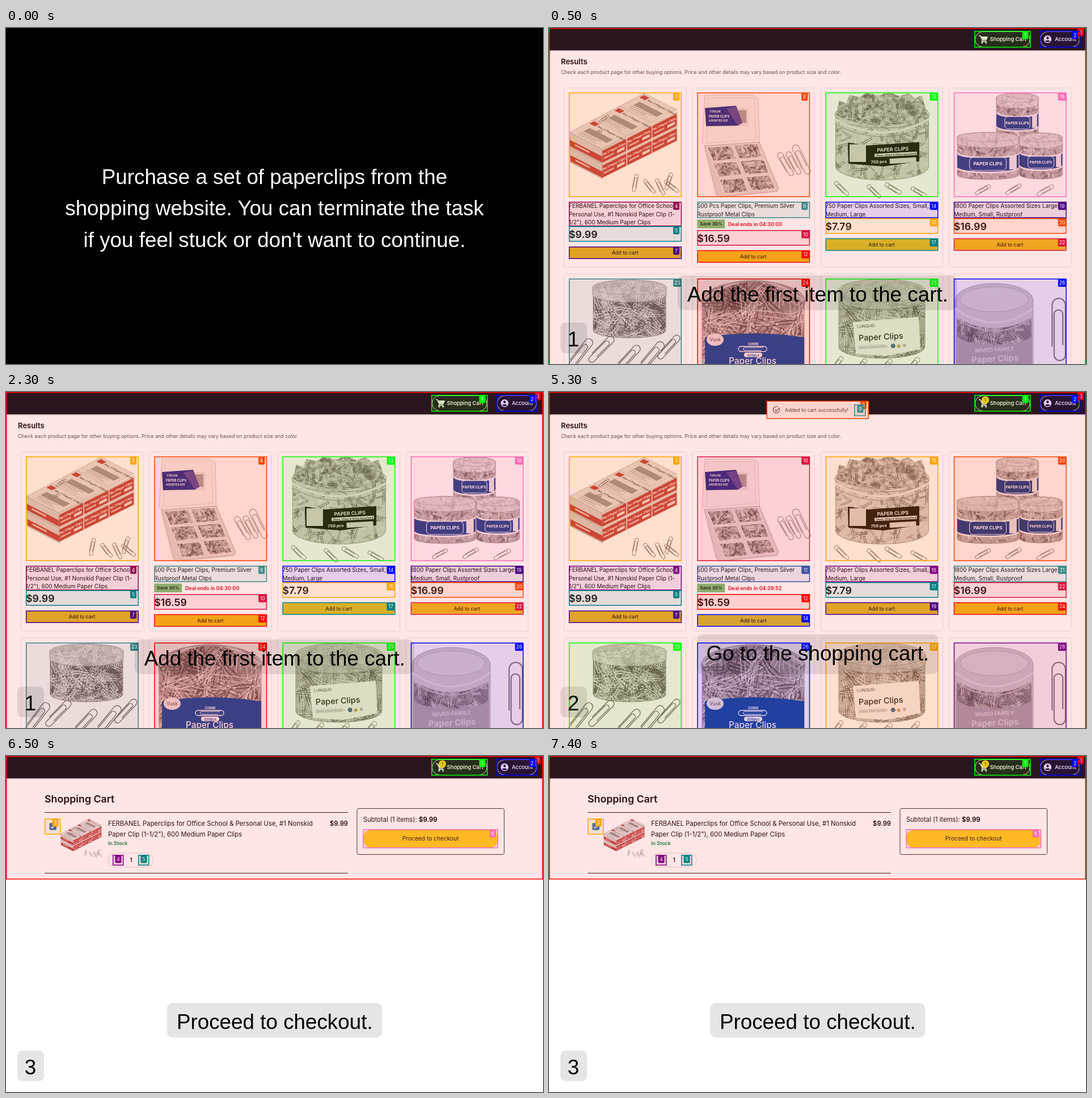
Animation of 947x592 px, one loop 8000 ms. Source, as an HTML page:

```html
<!DOCTYPE html>
<html lang="en">
<head>
<meta charset="utf-8">
<title>Paperclip shopping task</title>
<style>
html, body { margin: 0; width: 100%; height: 100%; overflow: hidden; background: #fff; }
svg { display: block; width: 100vw; height: 100vh; }
text { font-family: Inter, sans-serif; white-space: pre; }
.cap { font-family: "Liberation Sans", Arial, sans-serif; font-size: 36.8px; }
</style>
</head>
<body>
<svg id="stage" viewBox="0 0 947 592" preserveAspectRatio="none"></svg>
<script>
const PALETTE = ['#f00', '#0f0', '#00f', '#ffa500', '#800080', '#008080',
  '#ff69b4', '#4b0082', '#ff4500', '#3c8a86', '#dc143c', '#4054a4'];

let seed = 7;
const rnd = () => (seed = seed * 16807 % 2147483647) / 2147483647;
const f = v => v.toFixed(1);

// ---- basic shapes ----
const rect = (x, y, w, h, fill, more = '') =>
  `<rect x="${x}" y="${y}" width="${w}" height="${h}" fill="${fill}" ${more}/>`;
const path = (d, fill, stroke = 'none', sw = 1, more = '') =>
  `<path d="${d}" fill="${fill}" stroke="${stroke}" stroke-width="${sw}" ${more}/>`;
const poly = (pts, fill, stroke = 'none', sw = 1) => path(`M${pts}Z`, fill, stroke, sw);
const oval = (x, y, rx, ry, fill, stroke = 'none', sw = 1) =>
  `<ellipse cx="${x}" cy="${y}" rx="${rx}" ry="${ry}" fill="${fill}" stroke="${stroke}" stroke-width="${sw}"/>`;
const text = (x, y, size, s, fill = '#141414', weight = 400, anchor = 'start') =>
  `<text x="${x}" y="${y}" font-size="${size}" fill="${fill}" font-weight="${weight}" text-anchor="${anchor}">${s}</text>`;
const mid = (x, y, size, s, fill, weight) => text(x, y, size, s, fill, weight, 'middle');
const group = (transform, s) => `<g transform="${transform}">${s}</g>`;

// ---- numbered element boxes ----
function mark(n, x, y, x2, y2, c = PALETTE[n % 12]) {
  const w = n > 9 ? 14.5 : 11, lx = x2 - 15;
  return rect(x + .75, y + .75, x2 - x - 1.5, y2 - y - 1.5, c, `fill-opacity=".1" stroke="${c}" stroke-width="1.5"`) +
    rect(lx, y + .5, w, 14, c, 'rx="2"') + mid(lx + w / 2, y + 10.6, 8.6, n, '#fff');
}

// ---- photo parts ----
function clip(x, y, L, angle, stroke = '#8d8784', sw = 1) {
  const w = L * .11;
  const d = `M${-w} ${L * .28}V${-L * .4}a${w} ${w} 0 0 1 ${2 * w} 0V${L * .42}a${w * .85} ${w * .85} 0 0 1 ${-1.7 * w} 0V${-L * .25}a${w * .65} ${w * .65} 0 0 1 ${1.3 * w} 0V${L * .26}`;
  return group(`translate(${x} ${y}) rotate(${angle})`, path(d, 'none', stroke, sw));
}

let clipCount = 0;
function heap(shape, n, x, y, w, h, len, sw = .8) {
  const id = 'c' + clipCount++;
  let s = '';
  for (const shade of ['#8f8986', '#4a4644', '#efecea', '#66605d', '#dcd8d5']) {
    let d = '';
    for (let i = 0; i < n / 5; i++) {
      const a = rnd() * 6.283, l = len * (.6 + rnd() * .6), dx = Math.cos(a) * l, dy = Math.sin(a) * l;
      d += `M${f(x + rnd() * w - dx / 2)} ${f(y + rnd() * h - dy / 2)}l${f(dx)} ${f(dy)}l${f(-dy * .13)} ${f(dx * .13)}l${f(-dx * .85)} ${f(-dy * .85)}`;
    }
    s += path(d, 'none', shade, sw, 'stroke-linejoin="round"');
  }
  return `<clipPath id="${id}"><path d="${shape}"/></clipPath><g clip-path="url(#${id})">${s}</g>`;
}

const tube = (cx, rx, ry, y1, y2) =>
  `M${cx - rx} ${y1}a${rx} ${ry} 0 0 1 ${2 * rx} 0V${y2}a${rx} ${ry} 0 0 1 ${-2 * rx} 0Z`;
const band = (cx, rx, ry, y1, y2, fill) =>
  path(`M${cx - rx} ${y1}a${rx} ${ry} 0 0 0 ${2 * rx} 0V${y2}a${rx} ${ry} 0 0 1 ${-2 * rx} 0Z`, fill);

function jar(cx, rx, ry, y1, y2, n, len, fill = '#b5afac', sw = .8) {
  const shape = tube(cx, rx, ry, y1, y2);
  return path(shape, fill) + heap(shape, n, cx - rx, y1 - ry, 2 * rx, y2 - y1 + 2 * ry, len, sw) +
    path(shape, 'none', '#a19b98', 1);
}
function lid(cx, rx, ry, y, h) {
  return path(tube(cx, rx, ry, y, y + h), '#eeebe9', '#a19b98', 1, 'fill-opacity=".6"') +
    oval(cx, y, rx, ry, 'none', '#b5afac');
}

function boxesPhoto() {
  const red = '#bf4244';
  let s = '';
  for (let i = 0; i < 3; i++) {
    for (let j = 0; j < 2; j++) {
      s += group(`matrix(.9 -.45 0 1 ${93 + 44.3 * i} ${213 - 22 * i + 26 * j})`,
        rect(0, 0, 49.3, 26, red, 'stroke="#efe6e2" stroke-width="1.6"') + rect(0, 0, 49.3, 4, '#ddd0cc') +
        text(2, 13, 5.7, 'No.1 Paper Clips', '#fff', 700) + rect(4, 17, 20, 3, '#e3b3af') + rect(30, 16, 15, 5, '#ecd5d0'));
    }
    s += group(`matrix(.57 .29 -.44 .23 ${36 + 44 * (i + 1)} ${184 - 23 * (i + 1)})`,
      rect(0, 0, 100, 100, '#e3dedb', 'stroke="#c3bab5" stroke-width="2"') +
      rect(5, 8, 17, 18, red) + text(26, 24, 11, 'No.1 Paper Clips', '#4a4644', 600) +
      rect(18, 42, 72, 25, '#9c9693') + rect(18, 72, 60, 3, '#aaa') + rect(18, 80, 48, 3, '#aaa') + rect(18, 88, 60, 3, '#bbb'));
  }
  for (let j = 0; j < 2; j++)
    s += group(`matrix(.9 .46 .04 1 ${36 + j} ${184 + 27 * j})`,
      rect(0, 0, 63, 26, '#d6cecb', 'stroke="#a8a09c" stroke-width=".7"') +
      rect(0, 13, 63, 11, red) + rect(10, 16, 28, 3, '#e6c5c0'));
  return s + clip(97, 160, 20, 55) + clip(84, 184, 19, 75) +
    clip(152, 273, 30, 12) + clip(177, 279, 29, -38) + clip(196, 280, 30, -25) + clip(211, 270, 30, 18) + clip(216, 279, 30, -50);
}

function trayPhoto() {
  let s = poly('275 118L359 118L369 124L371 202L276 209L270 202', '#f6f3f2', '#d3ccc9') +
    poly('280 123L362 123L365 196L278 203', 'none', '#e2dcda') +
    rect(306, 141, 45, 32, '#e8e4e2') + rect(334, 145, 14, 22, '#aaa3a0') +
    poly('275 141L330 137L341 167L333 172L277 173', '#24308f') + poly('313 142L330 138L341 167L333 172', '#5a4d9d') +
    text(283, 149, 5, 'TOVLEK', '#fff', 700) + text(282, 158, 5.7, 'PAPER CLIPS', '#fff', 700) + text(282, 165, 4.3, 'ASSORTED SIZE', '#fff', 700) +
    poly('274 208L371 201L405 282L402 288L301 298L295 293', '#e2dcda', '#b9b1ae');
  const cells = [[279, 207], [325, 203], [289, 235], [336, 231], [300, 264], [347, 259]];
  for (const [x, y] of cells) {
    const d = `M${x} ${y + 3}l42 -3l10 24l-41 4Z`;
    s += path(d, '#b3aca9') + heap(d, 85, x, y, 50, 28, 12) + path(d, 'none', '#f3efed', 1.5);
  }
  return s + clip(417, 240, 45, -30) + clip(431, 238, 43, -28) + clip(445, 232, 55, -26);
}

function drumPhoto() {
  const dome = 'M506 153L512 128L524 132L530 118L548 122L560 114L582 119L600 113L618 120L634 115L645 124L657 119L668 153Q587 192 506 153Z';
  return jar(587.5, 82, 24, 157, 244, 260, 22, '#d3cfcb') + path(dome, '#b5b0ac') + heap(dome, 460, 504, 112, 166, 60, 20) +
    oval(587.5, 153, 83, 23, 'none', '#a19b98', 1.3) + path('M504 160Q587 208 671 160', 'none', '#e6e3e0', 4) +
    path('M504 169Q587 214 671 169', 'none', '#8b8583', 1) +
    poly('527 202L562 207L653 201L653 235L590 244L528 239', '#171514') + rect(530, 205, 29, 31, '#d9d5d1') +
    group('rotate(-3 605 222)', text(579, 217, 8.8, 'PAPER CLIPS', '#fff', 600) + rect(574, 220, 75, 6, '#e6e2de') +
      text(576, 225, 4.3, '28mm, 33mm &amp; 50mm Assorted Size', '#222', 700) + text(567, 237, 7.2, '750 pcs', '#fff', 700) + rect(600, 230, 47, 9, '#d9d5d1')) +
    clip(516, 283, 32, -45) + clip(573, 288, 30, -45) + clip(607, 283, 32, -58) + clip(652, 289, 30, -60);
}

function trioPhoto() {
  const blue = '#153f8a';
  const one = (cx, rx, y1, y2, b1, b2, size) =>
    jar(cx, rx, 8, y1, y2, 150, 13) + lid(cx, rx, 8, y1, 11) +
    band(cx, rx, 8, b1, b2, '#eceaec') + band(cx, rx, 8, b1 + 3, b2 - 3, blue) +
    rect(cx - rx * .6, b1 + 9, rx * 1.2, b2 - b1 - 6, blue, 'rx="6" stroke="#fff" stroke-width="1"') +
    mid(cx, (b1 + b2) / 2 + 8.5, size, 'PAPER CLIPS', '#fff', 700) + rect(cx + rx * .7, b1 + 6, rx * .24, b2 - b1 - 5, '#e9e6e8');
  return one(826, 37, 123, 187, 147, 175, 6.6) + one(867.5, 38, 193, 258, 217, 244, 6.2) + one(774, 54, 192, 259, 219, 248, 8) +
    clip(765, 285, 29, 62) + clip(819, 284, 30, 60) + clip(875, 286, 32, 62);
}

function jarPhoto() {
  const loose = (x, y, len, a) => clip(x, y, len, a, '#77726f', 1.4);
  return jar(142, 64, 13, 458, 533, 270, 36, '#a9a4a1', 1.1) + lid(142, 65, 13, 457, 13) +
    loose(54, 575, 65, 38) + loose(92, 566, 58, 45) + loose(138, 583, 60, 43) + loose(179, 580, 66, 40) + loose(211, 562, 52, 43);
}

function bluePhoto() {
  const blue = '#0c4fa5';
  return jar(360, 90, 38, 485, 620, 250, 62, '#a9a4a1', 1.3) + path('M271 480Q360 410 449 480', 'none', '#ddd', 4) +
    oval(360, 482, 91, 36, 'none', '#999', 1.5) + path('M271 492Q360 555 449 492', 'none', '#bbb', 2) +
    path('M275 545Q360 531 450 545V620H275Z', blue) + oval(293, 549, 15, 11, '#eceaea') + mid(293, 552, 8.5, 'Vusk', '#555') +
    mid(360, 559, 6, '50MM', '#fff', 600) + rect(334, 561, 50, 9, 'none', 'rx="4.5" stroke="#fff" stroke-width="1.3"') +
    path('M378 563H345a2.5 2.5 0 0 0 0 5H374', 'none', '#fff', 1) + rect(344, 572, 32, 8, '#fff', 'rx="4"') +
    mid(360, 578.5, 6, '320pcs', blue, 600) + mid(359, 592, 15.4, 'Paper Clips', '#fff', 500);
}

function whitePhoto() {
  return jar(587, 76, 20, 465, 562, 300, 34, '#b5b0ad', 1) + lid(587, 77, 20, 463, 13) +
    poly('536 518L652 509L655 566L594 578L541 574', '#f4f2f0') +
    group('rotate(-3 590 545)', text(544, 526, 7.2, 'LUNQUEI', '#4d4947') + text(546, 549, 14.4, 'Paper Clips', '#252322', 500) +
      rect(545, 557, 48, 7, '#ddd') + text(546, 562.5, 4.8, '28mm, 33mm &amp; 50mm', '#999') + oval(606, 561, 4, 4, '#476a94') + oval(616, 562, 3, 3, '#caa257') + oval(626, 561, 3, 3, '#bbb')) +
    clip(507, 594, 34, 35) + clip(548, 597, 34, 40) + clip(592, 597, 34, 45) + clip(640, 596, 38, 40);
}

function palePhoto() {
  const contents = 'M719 510Q785 548 851 510V550Q785 582 719 550Z';
  return path(tube(785, 69, 30, 480, 620), '#d2ced1', '#b3adb2') + oval(785, 478, 60, 22, '#dedadd', '#b9b3b8') +
    path(contents, '#928d90') + heap(contents, 150, 719, 508, 132, 68, 26) +
    path('M716 494Q785 544 854 494', 'none', '#e4e0e3', 3) + path('M717 510Q785 558 853 510', 'none', '#c4bfc3', 2) +
    band(785, 67, 19, 539, 620, '#b0aaaf') +
    group('rotate(-3 785 570)', mid(786, 570, 9.5, 'MIVEO FAMILY', '#dcd8dc', 700) + mid(786, 588, 15, 'Paper Clips', '#dcd8dc', 700)) +
    clip(899, 531, 107, 0, '#85818a', 2.2);
}

const photos = [boxesPhoto, trayPhoto, drumPhoto, trioPhoto, jarPhoto, bluePhoto, whitePhoto, palePhoto];
const use = i => `<use href="#p${i}"/>`;

// ---- page ----
const NAME = 'FERBANEL Paperclips for Office School &amp;';
const ITEMS = [
  { lines: [NAME, 'Personal Use, #1 Nonskid Paper Clip (1-', '1/2"), 600 Medium Paper Clips'], price: '$9.99', py: 349, by: 385 },
  { lines: ['500 Pcs Paper Clips, Premium Silver', 'Rustproof Metal Clips'], price: '$16.59', py: 356, by: 391.5 },
  { lines: ['750 Paper Clips Assorted Sizes, Small,', 'Medium, Large'], price: '$7.79', py: 335, by: 370.5 },
  { lines: ['1800 Paper Clips Assorted Sizes Large', 'Medium, Small, Rustproof'], price: '$16.99', py: 335, by: 370.5 }
];

function header(inCart) {
  const pill = (x, w) => rect(x, 6.5, w, 27, 'none', 'rx="13.5" stroke="#fff" stroke-width=".9"');
  return rect(0, 39.5, 947, 2, '#000', 'opacity=".06"') + rect(0, 0, 947, 39.5, '#131921') + pill(751.5, 96.5) + pill(866, 69.5) +
    path('M758 13.5h2.5l4 8h6l2.6-5.5h-10.5M764.5 21.5l-1.3 2.3h8.6', 'none', '#fff', 1.5) +
    poly('762 15L773 15L770.5 20.5L764.5 20.5', '#fff') + oval(763.8, 26, 1.4, 1.4, '#fff') + oval(770.8, 26, 1.4, 1.4, '#fff') +
    text(777.5, 23.2, 9.25, 'Shopping Cart', '#fff', 600) + text(892, 23.2, 9.25, 'Account', '#fff', 600) +
    oval(879.3, 19.8, 6.8, 6.8, '#fff') + oval(879.3, 17.5, 2.2, 2.2, '#131921') + path('M874.9 23a5 3 0 0 1 8.8 0a5 4 0 0 1-8.8 0Z', '#131921') +
    (inCart ? oval(769.5, 14, 6.6, 6.6, '#ffd814') + mid(769.5, 17, 8, '1', '#333') : '');
}
const headerMarks = bottom => mark(0, 0, 0, 947, bottom) + mark(1, 750, 5, 849.5, 34.5) + mark(2, 865, 5, 937, 34.5);

function caption(s, x, y, w, h, base, step) {
  return rect(x, y, w, h, '#000', 'rx="10" opacity=".1"') + rect(20, 519, 47, 54, '#000', 'rx="9" opacity=".1"') +
    `<text class="cap" text-anchor="middle" x="473.8" y="${base}">${s}</text>` +
    `<text class="cap" text-anchor="middle" x="43" y="561">${step}</text>`;
}

function shop(ids, row2, clock, inCart, tints = {}) {
  let s = rect(0, 0, 947, 592, '#fff') + header(inCart) + text(21, 63.7, 13.1, 'Results', '#111', 600) +
    text(21, 81, 8.93, 'Check each product page for other buying options. Price and other details may vary based on product size and color.', '#565959');
  let m = headerMarks(700);
  ITEMS.forEach((it, i) => {
    const x = 35 + 226.25 * i, r = x + 199;
    for (const y of [105.5, 433]) s += rect(x - 8.5, y, 215.5, 316, 'none', 'rx="4" stroke="#e3e3e6" stroke-width=".9"');
    s += use(i) + use(i + 4);
    it.lines.forEach((l, k) => s += text(x, 317.2 + 14.5 * k, 10, l));
    s += text(x, it.py + 20.5, 17.76, it.price, '#0f1111', 600) +
      rect(x + .7, it.by + .7, 197.5, 20.6, '#f0c820', 'rx="6"') + mid(x + 99, it.by + 14.3, 8.9, 'Add to cart', '#111', 400);
    if (i === 1) s += rect(x, 337.5, 49, 15.5, '#82c17c') + text(x + 5, 348.2, 8.1, 'Save 30%', '#15240f', 600) +
      text(x + 54.7, 348.7, 8.9, 'Deal ends in ' + clock, '#dc0a1e', 600);
    const [a, b, c, d] = ids[i], end = i ? 335 : 349.5;
    m += mark(a, x, 113.5, r, 298) + mark(b, x, 306, r, end, tints[b]) + mark(c, x, it.py, r, it.py + 27.5) +
      mark(d, x, it.by, r, it.by + 22) + mark(row2[i], x, 441.5, r, 626, tints[row2[i]]);
  });
  if (inCart) {
    s += rect(384, 16, 180, 31, '#fff', 'rx="2"') + path('M406.4 29.5a5.7 5.7 0 1 1-3-3.4M398.3 31l2.5 2.6l6-6.3', 'none', '#444', 1.1) +
      text(416, 34.8, 8.66, 'Added to cart successfully!', '#444');
    m += mark(8, 383.5, 15.5, 564, 47.5) + mark(9, 538, 22, 558.5, 42.5);
  }
  return s + m;
}

function cart() {
  const rule = y => rect(68, y, 535, 1, '#222');
  return rect(0, 0, 947, 592, '#fff') + header(true) + text(68, 81.5, 17.76, 'Shopping Cart', '#111', 600) + rule(99) + rule(206) +
    group('translate(82.7 66.4) scale(.38 .383)', use(0)) +
    rect(76.5, 118, 12.5, 12.5, '#1769c5', 'rx="2"') + path('M79 124.5l2.7 2.7l5-5.4', 'none', '#fff', 1.5) +
    text(180, 123.3, 11.35, NAME + ' Personal Use, #1 Nonskid') + text(180, 142, 11.35, 'Paper Clip (1-1/2"), 600 Medium Paper Clips') +
    text(603, 123.3, 11.2, '$9.99', '#111', 600, 'end') + text(180, 157, 8.9, 'In Stock', '#0d8a4b', 600) +
    rect(180.5, 171, 79.5, 24.5, 'none', 'rx="12.2" stroke="#d5d5d8" stroke-width=".9"') + mid(220.5, 187.3, 11, '1', '#111', 500) +
    path('M194 183.5h8M239 183.5h8M243 179.5v8', 'none', '#333', 1) +
    rect(619, 92.5, 259.5, 81, 'none', 'rx="3" stroke="#222" stroke-width=".9"') +
    text(630, 116.3, 11.25, 'Subtotal (1 items): <tspan font-weight="700">$9.99</tspan>') +
    rect(631, 131.5, 236, 31, '#c9b48b', 'rx="13" opacity=".6"') + rect(630.5, 130, 236.5, 31, '#ffd814', 'rx="13"') +
    mid(748.7, 149.3, 10.2, 'Proceed to checkout') +
    headerMarks(217.5) + mark(3, 68, 110, 96.5, 138.5) + mark(4, 188, 174, 207.5, 193) + mark(5, 233, 174, 252.5, 193) + mark(6, 629.5, 129, 868, 162.5);
}

function intro() {
  const lines = ['Purchase a set of paperclips from the', 'shopping website. You can terminate the task', "if you feel stuck or don't want to continue."];
  return rect(0, 0, 947, 592, '#000') + lines.map((l, i) =>
    `<text class="cap" fill="#fff" text-anchor="middle" x="473.5" y="${275 + 55.4 * i}">${l}</text>`).join('');
}

const scenes = [
  [0, intro()],
  [500, shop([[3, 4, 5, 7], [8, 9, 10, 12], [13, 14, 15, 17], [18, 19, 20, 22]], [23, 24, 25, 26], '04:30:00', false, { 4: '#960a50', 23: '#3a8484' }) +
    caption('Add the first item to the cart.', 227, 436, 493, 61, 482, 1)],
  [3500, shop([[3, 4, 5, 7], [10, 11, 12, 14], [15, 16, 17, 19], [20, 21, 22, 24]], [25, 26, 27, 28], '04:29:52', true) +
    caption('Go to the shopping cart.', 261, 427, 425.5, 70, 473, 2)],
  [6500, cart() + caption('Proceed to checkout.', 284, 435, 379.5, 61, 481, 3)]
];

const stage = document.getElementById('stage');
stage.innerHTML = '<defs>' + photos.map((p, i) => `<g id="p${i}">${p()}</g>`).join('') + '</defs>' +
  scenes.map(([, s]) => `<g class="scene" display="none">${s}</g>`).join('');
const groups = [...stage.querySelectorAll('.scene')];

const start = performance.now();
let shown = -1;
function draw() {
  const t = (performance.now() - start) % 8000;
  const now = scenes.filter(([at]) => t >= at).length - 1;
  if (now !== shown) {
    groups.forEach((g, i) => g.setAttribute('display', i === now ? 'inline' : 'none'));
    shown = now;
  }
  requestAnimationFrame(draw);
}
draw();
</script>
</body>
</html>
```
